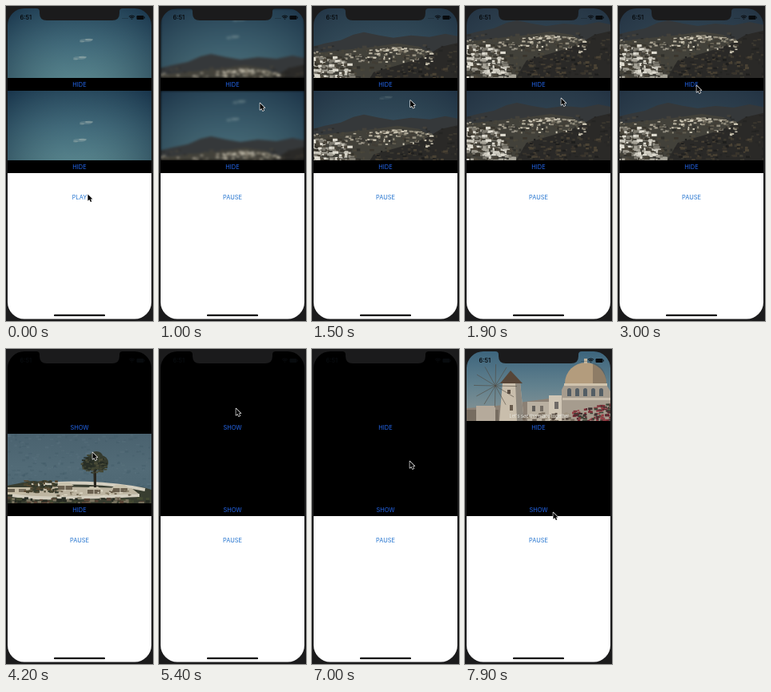
Animation of 184x394 px, one loop 8 s. Source, as an HTML page with a canvas:

```html
<!DOCTYPE html>
<html lang="en">
<head>
<meta charset="utf-8">
<title>Two video players</title>
<style>
html, body { margin: 0; width: 100%; height: 100%; overflow: hidden; background: #1b1b1c; }
canvas { display: block; width: 184px; height: 394px; }
</style>
</head>
<body>
<canvas id="stage"></canvas>
<script>
const LOOP = 8000, STEP = 100, VW = 180, VH = 87;
const FONT = 'Inter, "Liberation Sans", sans-serif';
const dpr = window.devicePixelRatio || 1;
const stage = document.getElementById('stage');
const film = document.createElement('canvas');
const ctx = setup(stage, 184, 394);
const v = setup(film, VW, VH);

const CURSOR = [
  [200, 102, 235], [1000, 126, 121], [1900, 120, 115], [2700, 98, 99],
  [3300, 98, 99], [4200, 108, 129], [4600, 97, 200], [4900, 97, 200],
  [5400, 96, 74], [5500, 96, 77], [6000, 96, 98], [6500, 96, 98],
  [7000, 122, 140], [7900, 110, 204]
];
const TILT = [[200, 68], [1000, 42], [1700, 4], [1900, 0]];

function setup(c, w, h) {
  c.width = Math.round(w * dpr);
  c.height = Math.round(h * dpr);
  const g = c.getContext('2d');
  g.scale(dpr, dpr);
  return g;
}

function random(seed) {
  return () => (seed = (seed * 16807) % 2147483647) / 2147483647;
}

function track(keys, t) {
  if (t <= keys[0][0]) return keys[0].slice(1);
  for (let i = 1; i < keys.length; i++) {
    const a = keys[i - 1], b = keys[i];
    if (t <= b[0]) {
      const p = (t - a[0]) / (b[0] - a[0]);
      return a.slice(1).map((n, k) => n + (b[k + 1] - n) * p);
    }
  }
  return keys[keys.length - 1].slice(1);
}

const ramp = (t, a, b) => Math.min(1, Math.max(0, (t - a) / (b - a)));

function rect(g, x, y, w, h, color) {
  g.fillStyle = color;
  g.fillRect(x, y, w, h);
}

function poly(g, color, ...pts) {
  g.fillStyle = color;
  g.beginPath();
  for (let i = 0; i < pts.length; i += 2) g.lineTo(pts[i], pts[i + 1]);
  g.closePath();
  g.fill();
}

function oval(g, x, y, rx, ry, color) {
  g.fillStyle = color;
  g.beginPath();
  g.ellipse(x, y, rx, ry, 0, 0, 7);
  g.fill();
}

function round(g, x, y, w, h, r, color) {
  g.fillStyle = color;
  g.beginPath();
  g.roundRect(x, y, w, h, r);
  g.fill();
}

function wash(g, ...colors) {
  const grad = g.createLinearGradient(0, 0, 0, VH);
  colors.forEach((c, i) => grad.addColorStop(i / (colors.length - 1), c));
  rect(g, 0, 0, VW, VH, grad);
}

// Small dabs scattered over an area
function dabs(g, seed, n, place, colors, size) {
  const r = random(seed);
  for (let i = 0; i < n; i++) {
    const [x, y] = place(r(), r());
    const w = size * (0.5 + r()), h = size * (0.35 + r() * 0.45);
    rect(g, x, y, w, h, colors[Math.floor(r() * colors.length)]);
  }
}

function cloud(x, y) {
  oval(v, x, y, 8, 2, 'rgba(160,180,178,.28)');
  oval(v, x + 4, y - 1, 5, 1.3, 'rgba(180,192,184,.4)');
  oval(v, x - 5, y + 1.5, 3, 1, 'rgba(180,192,184,.35)');
}

function coast(t) {
  const off = track(TILT, t)[0], near = 1 - off / 68;
  wash(v, '#1d3f5a', '#386176', '#527f8a');
  const glow = v.createRadialGradient(85, 70, 15, 90, 55, 120);
  glow.addColorStop(0, 'rgba(100,140,140,.2)');
  glow.addColorStop(1, 'rgba(8,28,50,.6)');
  rect(v, 0, 0, VW, VH, glow);
  rect(v, 0, 0, VW, VH, `rgba(42,52,64,${near * 0.65})`);
  v.save();
  v.globalAlpha = 1 - near * 0.9;
  cloud(98, off - 28);
  cloud(90, off - 6);
  v.restore();
  if (off > 66) return;

  v.save();
  v.translate(-3 * ramp(t, 1900, 3400), off);
  poly(v, '#35383a', -5, 34, 14, 29, 34, 25, 50, 18, 63, 15, 82, 19, 100, 22,
    122, 19, 145, 21, 165, 17, 190, 22, 190, 90, -5, 90);
  poly(v, '#42413a', -5, 42, 30, 38, 70, 34, 105, 29, 132, 33, 158, 48, 172, 90, -5, 90);
  poly(v, '#2a2927', 190, 26, 160, 33, 138, 46, 110, 55, 75, 65, 60, 90, 190, 90);
  dabs(v, 41, 230, (a, b) => [a * 190 - 4, 30 + b * 58],
    ['#27272480', '#4d493a80', '#5a513d60', '#20201f90'], 4);
  dabs(v, 9, 150, (a, b) => [66 + a * 82, 33 + Math.abs(a - 0.45) * 9 + b * b * 17],
    ['#b9b3a1', '#918c7c', '#d0cab8', '#625d50', '#413d35'], 3.6);
  dabs(v, 77, 60, (a, b) => [a * 68, 38 + b * 14],
    ['#8f8b7f', '#6c685c', '#b0a998', '#45423a'], 3);
  dabs(v, 23, 210, (a, b) => [-5 + a * (44 + b * 20), 45 + b * 42],
    ['#c9c6bb', '#a5a297', '#dedbd0', '#7c796f', '#4b463b', '#38352d'], 5.5);
  dabs(v, 5, 70, (a, b) => [70 + a * 95, 58 + b * 30], ['#4a4234', '#39342c', '#1e1e1d'], 4);
  v.restore();
}

function umbrella(x, y, w) {
  rect(v, x - w / 2 + 2, y + 2, w - 4, 5, '#6a604f');
  poly(v, '#c9c2ad', x - w / 2, y + 2, x - w / 4, y - 2, x + w / 4, y - 2, x + w / 2, y + 2);
  rect(v, x - 0.5, y + 2, 1, 7, '#d5cfbd');
}

function terrace(t) {
  wash(v, '#4a626f', '#526b77', '#4b6470');
  dabs(v, 61, 240, (a, b) => [a * VW, b * 66], ['#60788240', '#3d566550'], 3.5);
  v.save();
  v.translate(2 - 2 * ramp(t, 3400, 4200) - 2 * ramp(t, 4200, 5000), 0);
  poly(v, '#383d30', -6, 66, 30, 59, 75, 62, 120, 63, 170, 67, 190, 73, 190, 90, -6, 90);
  rect(v, -6, 67, 37, 9, '#c6bda6');
  rect(v, 0, 69, 9, 4, '#686151');
  rect(v, 14, 69, 9, 4, '#7a7160');
  v.lineWidth = 4;
  v.strokeStyle = '#d4cfc0';
  v.beginPath();
  v.moveTo(30, 64);
  v.bezierCurveTo(70, 60, 125, 60, 172, 70);
  v.stroke();
  poly(v, '#bdb5a1', 10, 77, 55, 66, 155, 68, 164, 75, 120, 79, 60, 82);
  v.beginPath();
  v.moveTo(6, 77);
  v.bezierCurveTo(45, 84, 110, 79, 165, 77);
  v.stroke();
  umbrella(72, 63, 22);
  umbrella(108, 68, 20);
  umbrella(141, 66, 22);
  dabs(v, 18, 80, (a, b) => [20 + a * 40, 58 + b * 14],
    ['#2f3429', '#4b4631', '#59482f', '#383c2d'], 4);
  dabs(v, 33, 100, (a, b) => [a * 184 - 4, 79 + b * 9],
    ['#272c23', '#434932', '#594436', '#7a7460'], 5);
  dabs(v, 8, 40, (a, b) => [58 + a * 95, 70 + b * 7], ['#665b48', '#8a8069', '#ded8c6'], 3);
  poly(v, '#29271f', 107, 36, 111, 36, 111, 67, 108, 67);
  oval(v, 109, 36, 13, 10, '#30362b');
  oval(v, 102, 39, 9, 7, '#292f27');
  oval(v, 117, 36, 9, 9, '#353a2d');
  oval(v, 111, 28, 8, 6, '#353b2f');
  dabs(v, 15, 90, (a, b) => {
    const r = Math.sqrt(a) * 17;
    return [108 + r * Math.cos(b * 6.28), 36 + r * 0.72 * Math.sin(b * 6.28)];
  }, ['#252b24', '#3f4432', '#4a4b37'], 3);
  v.restore();
}

function windmill(t) {
  wash(v, '#3d657d', '#62818e', '#8c9796');
  poly(v, '#8b8074', 0, 71, 30, 69, 80, 62, 125, 56, 180, 60, 180, 87, 0, 87);
  rect(v, 0, 73, 40, 14, '#766c60');
  rect(v, 12, 68, 24, 19, '#b5aa9b');

  poly(v, '#c9beac', 45, 39, 67, 39, 72, 87, 41, 87);
  poly(v, '#8e887e', 61, 39, 67, 39, 72, 87, 63, 87);
  poly(v, '#574537', 42, 40, 55, 24, 70, 40);
  rect(v, 51, 48, 4, 5, '#594d42');
  rect(v, 54, 67, 4, 7, '#695c4d');
  v.strokeStyle = '#51483f';
  v.lineWidth = 0.6;
  v.beginPath();
  const turn = (t - 7200) * 0.00003;
  for (let i = 0; i < 12; i++) {
    const a = turn + i * Math.PI / 6;
    v.moveTo(36, 43);
    v.lineTo(36 + 27 * Math.cos(a), 43 + 27 * Math.sin(a));
  }
  v.stroke();

  rect(v, 76, 63, 28, 24, '#b9b0a1');
  rect(v, 82, 68, 4, 7, '#625e59');
  rect(v, 92, 68, 4, 7, '#746d64');
  rect(v, 103, 55, 25, 32, '#d0c6b5');
  rect(v, 110, 63, 5, 9, '#6f6b67');
  poly(v, '#a69c8e', 123, 40, 174, 40, 180, 50, 180, 87, 119, 87, 119, 48);
  v.fillStyle = '#b39c7d';
  v.beginPath();
  v.ellipse(149, 40, 26, 26, 0, Math.PI, 0);
  v.fill();
  v.fillStyle = 'rgba(82,73,67,.38)';
  v.beginPath();
  v.ellipse(158, 40, 17, 25, 0, -Math.PI / 2, 0);
  v.lineTo(158, 40);
  v.fill();
  rect(v, 147, 9, 4, 6, '#c4b69d');
  rect(v, 122, 40, 54, 3, '#d0c3ad');
  for (let i = 0; i < 5; i++) round(v, 126 + i * 10, 46, 5, 10, [3, 3, 0, 0], '#535d64');
  rect(v, 120, 58, 60, 3, '#c9bead');
  dabs(v, 54, 130, (a, b) => [132 + a * 50, 63 + b * 25 + (1 - a) * 10],
    ['#5d2730', '#7e3038', '#3e3030', '#963e45', '#3e4437'], 4);
  dabs(v, 12, 50, (a, b) => [70 + a * 62, 76 + b * 12], ['#594d43', '#776b5d', '#a09482'], 4);
  v.font = '5.6px ' + FONT;
  v.textAlign = 'center';
  v.fillStyle = 'rgba(235,235,230,.9)';
  v.fillText("Let's see this place together", 91, 83);
}

function scene(t) {
  if (t < 3400) coast(t);
  else if (t < 6500) terrace(t);
  else windmill(t);
}

function show(y, t) {
  const blur = t < 900 ? 0.5 : 1.4 * (1 - ramp(t, 1000, 1700));
  ctx.save();
  ctx.beginPath();
  ctx.rect(2, y, VW, VH);
  ctx.clip();
  if (t < 1700) ctx.filter = `blur(${blur * dpr}px)`;
  ctx.drawImage(film, 2, y, VW, VH);
  ctx.restore();
}

function label(text, y, color) {
  ctx.font = '7.4px ' + FONT;
  ctx.textAlign = 'center';
  ctx.fillStyle = color;
  ctx.fillText(text, 92, y);
}

function status() {
  ctx.font = '600 7.4px ' + FONT;
  ctx.textAlign = 'left';
  ctx.fillStyle = '#080b0e';
  ctx.fillText('6:51', 17.5, 17);
  for (let i = 0; i < 4; i++) oval(ctx, 146 + i * 2, 15.5, 0.5, 0.5, 'rgba(0,0,0,.5)');
  ctx.strokeStyle = '#080b0e';
  ctx.lineWidth = 1.1;
  for (let r = 1; r < 6; r += 2) {
    ctx.beginPath();
    ctx.arc(157.5, 17, r, -2.36, -0.78);
    ctx.stroke();
  }
  round(ctx, 163.5, 12, 9, 5, 1.2, '#080b0e');
  rect(ctx, 173, 13.5, 0.8, 2, '#080b0e');
}

function phone() {
  const c = '#1b1b1c';
  ctx.fillStyle = c;
  ctx.beginPath();
  ctx.rect(0, 0, 184, 394);
  ctx.roundRect(2, 3, 180, 388.5, 21);
  ctx.fill('evenodd');
  ctx.beginPath();
  ctx.moveTo(38, 3);
  ctx.quadraticCurveTo(42, 3, 42, 7);
  ctx.lineTo(42, 9);
  ctx.quadraticCurveTo(42, 18, 51, 18);
  ctx.lineTo(133, 18);
  ctx.quadraticCurveTo(142, 18, 142, 9);
  ctx.lineTo(142, 7);
  ctx.quadraticCurveTo(142, 3, 146, 3);
  ctx.fill();
}

function pointer(x, y) {
  ctx.save();
  ctx.translate(x, y);
  ctx.beginPath();
  const p = [0, 0, 0, 8.4, 2, 6.6, 3.4, 9.7, 4.9, 9, 3.5, 6, 6, 6];
  for (let i = 0; i < p.length; i += 2) ctx.lineTo(p[i] + 0.4, p[i + 1] + 0.4);
  ctx.closePath();
  ctx.lineJoin = 'round';
  ctx.lineWidth = 1.3;
  ctx.strokeStyle = '#fff';
  ctx.stroke();
  ctx.fillStyle = '#000';
  ctx.fill();
  ctx.restore();
}

function draw(t) {
  const topOn = t < 3300 || t >= 6500;
  const lowOn = t < 5000;
  rect(ctx, 0, 0, 184, 394, '#fff');
  rect(ctx, 2, 3, VW, 206, '#000');
  v.clearRect(0, 0, VW, VH);
  scene(t);
  if (topOn && (t < 3300 || t >= 7200)) show(3, t);
  if (lowOn) show(106, t);
  label(topOn ? 'HIDE' : 'SHOW', 101.3, '#2467ed');
  label(lowOn ? 'HIDE' : 'SHOW', 204.1, '#2467ed');
  label(t < 200 ? 'PLAY' : 'PAUSE', 242.1, '#2373cf');
  status();
  round(ctx, 60, 385.7, 64, 2.3, 1.1, '#000');
  phone();
  pointer(...track(CURSOR, t));
}

let last = -1;
const start = performance.now();
function tick() {
  const t = Math.floor(((performance.now() - start) % LOOP) / STEP) * STEP;
  if (t !== last) draw(last = t);
  requestAnimationFrame(tick);
}
tick();
</script>
</body>
</html>
```
